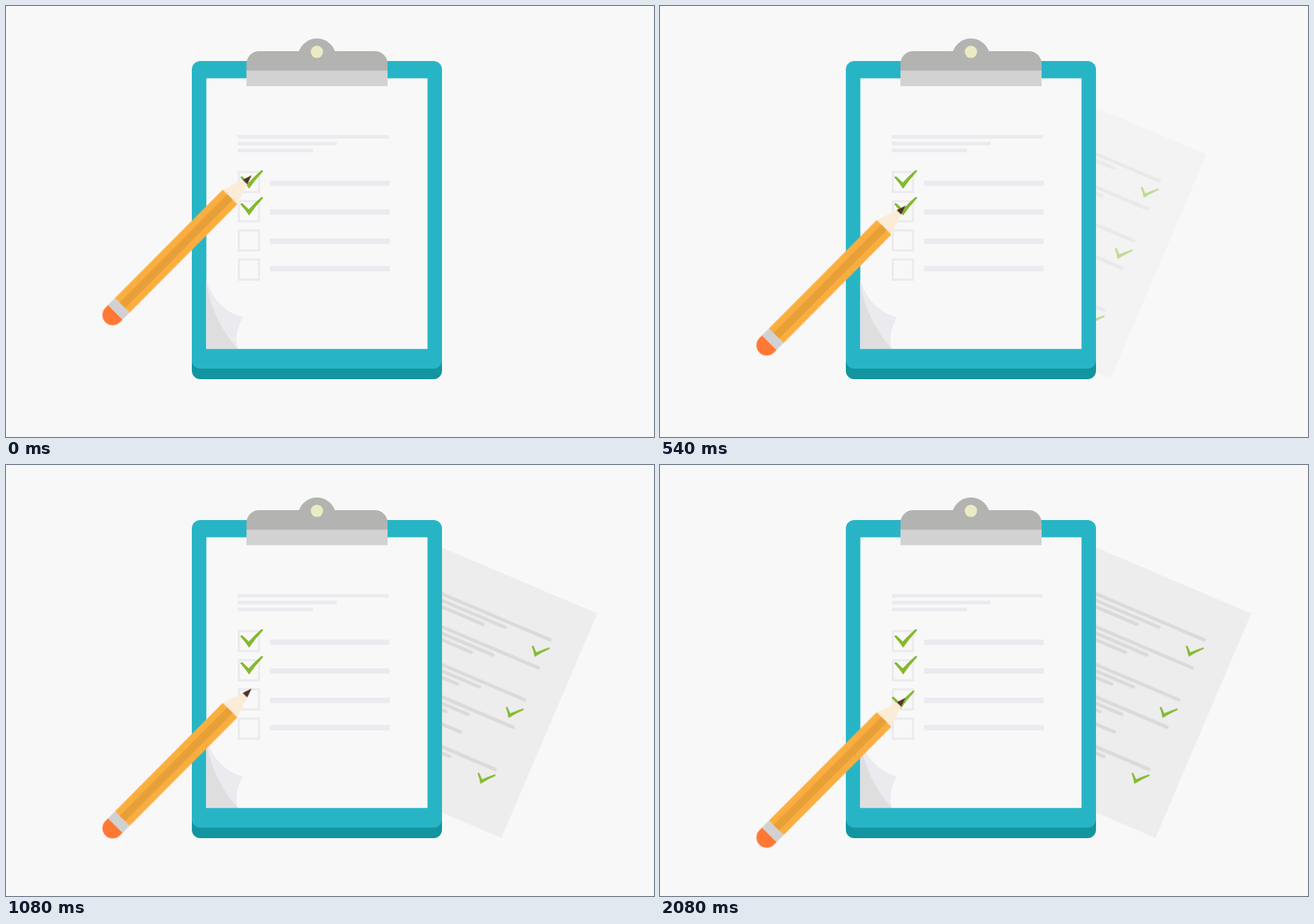
Animation, 917 px wide and 611 px high, one loop 3210 ms. Source, as an HTML page without scripts:

```html
<!DOCTYPE html>
<html lang="en">
<head>
<meta charset="utf-8">
<title>Checklist</title>
<style>
  html, body { margin: 0; width: 100%; height: 100%; overflow: hidden; background: #f8f8f8; }
  svg { display: block; width: 100%; height: 100%; }

  .pencil, .sheet, .fade, .tick { animation: 3210ms linear -1ms infinite both; }
  .pencil { animation-name: descend; }
  .sheet { animation-name: slide; }
  .fade { animation-name: appear; }
  .tick { animation-name: mark; }

  @keyframes descend {
    0% { transform: none; animation-timing-function: steps(18); }
    16.822% { transform: translateY(43px); animation-timing-function: steps(25); }
    40.187%, 100% { transform: translateY(90px); }
  }
  @keyframes slide {
    0% { transform: translateX(-128px); animation-timing-function: ease-in-out; }
    33.645%, 100% { transform: none; }
  }
  @keyframes appear {
    0% { opacity: 0; }
    7.477% { opacity: .18; }
    16.822% { opacity: .5; }
    27.103% { opacity: .92; }
    33.645%, 100% { opacity: 1; }
  }
  @keyframes mark {
    0%, 42.991% { opacity: 0; animation-timing-function: ease-in-out; }
    64.798%, 100% { opacity: 1; }
  }
</style>
</head>
<body>
<svg viewBox="0 0 917 611">
  <defs>
    <!-- origin at the lowest point of the tick -->
    <path id="check" fill="#84b92e" d="M-12.5-16Q-11.5-18.5-9-17L-.5-8.8Q9-19 17.5-26.2Q20.5-27 19.3-24Q9-13 0 0Q-6-9-12.5-16Z"/>
    <rect id="box" x="329.5" width="28.5" height="28.5" fill="none" stroke="#ebeaee" stroke-width="3"/>
    <rect id="row" x="373.5" width="169.5" height="7.8" rx="1" fill="#ebeaef"/>
    <g id="pair">
      <path d="M-250 0H-46.5"/>
      <path d="M-250 8.4H-112.5"/>
    </g>
    <g id="trio">
      <use href="#pair"/>
      <path d="M-250 16.8H-142.5"/>
    </g>
  </defs>

  <!-- loose sheet; its own origin is the top right corner -->
  <g class="sheet"><g class="fade">
    <g transform="translate(836.7 210.5) rotate(23.08)">
      <rect x="-280" width="280" height="345.8" fill="#ededed"/>
      <g stroke="#dadada" stroke-width="4.8" stroke-linecap="round">
        <use href="#trio" y="60.7"/>
        <use href="#trio" y="103.6"/>
        <use href="#trio" y="152.8"/>
        <use href="#trio" y="195"/>
        <path d="M-250 230.5H-112.5"/>
        <use href="#pair" y="260"/>
      </g>
      <use href="#check" transform="translate(-57.4 91.3) scale(.77)"/>
      <use href="#check" transform="translate(-57.4 185.4) scale(.77)"/>
      <use href="#check" transform="translate(-57.4 287) scale(.77)"/>
    </g>
  </g></g>

  <!-- clipboard -->
  <rect x="263" y="90" width="354" height="439" rx="12" fill="#12959f"/>
  <rect x="263" y="78" width="354" height="436" rx="12" fill="#27b5c6"/>
  <rect x="283.5" y="102.5" width="313" height="383.7" fill="#f8f8f8"/>
  <circle cx="440" cy="73" r="27" fill="#b3b3b1"/>
  <path d="M340.3 92V82a18 18 0 0 1 18-18H522a18 18 0 0 1 18 18V92Z" fill="#b3b3b1"/>
  <rect x="340.3" y="91.7" width="199.7" height="22" fill="#d2d2d2"/>
  <circle cx="440" cy="65" r="8.7" fill="#ebebc3"/>

  <!-- page content -->
  <path d="M328 185.5H541.5M328 195H468M328 204.8H434.5" stroke="#ebeaef" stroke-width="5"/>
  <use href="#box" y="235.3"/>
  <use href="#box" y="276.7"/>
  <use href="#box" y="318"/>
  <use href="#box" y="359.5"/>
  <use href="#row" y="247.5"/>
  <use href="#row" y="288.2"/>
  <use href="#row" y="329.8"/>
  <use href="#row" y="368.5"/>
  <use href="#check" x="344" y="259"/>
  <use href="#check" x="344" y="297"/>
  <use href="#check" class="tick" x="340.3" y="346"/>

  <!-- page curl -->
  <path d="M283.5 387C290 415 312 436 335 441C328 455 323 472 328 486H283.5Z" fill="#ebeaef"/>
  <path d="M283.5 390C287 425 306 462 328 486H283.5Z" fill="#dededf"/>

  <!-- pencil, drawn along its axis from the eraser -->
  <g class="pencil">
    <g transform="translate(151 438) rotate(-45.2)">
      <path d="M5.5-14.6H0A14.6 14.6 0 0 0 0 14.6H5.5Z" fill="#ff7834"/>
      <rect x="5.3" y="-14.6" width="14.5" height="29.2" fill="#d1d1d3"/>
      <path d="M235.4-14.6L279 0 235.4 14.6Z" fill="#fbecd8"/>
      <path d="M265.6-4.5L279 0 265.6 4.5Z" fill="#4f3325"/>
      <rect x="19.4" y="-14.6" width="216.2" height="29.2" fill="#fbae40"/>
      <rect x="19.4" y="-5.5" width="216.2" height="11" fill="#e79f38"/>
    </g>
  </g>
</svg>
</body>
</html>
```
